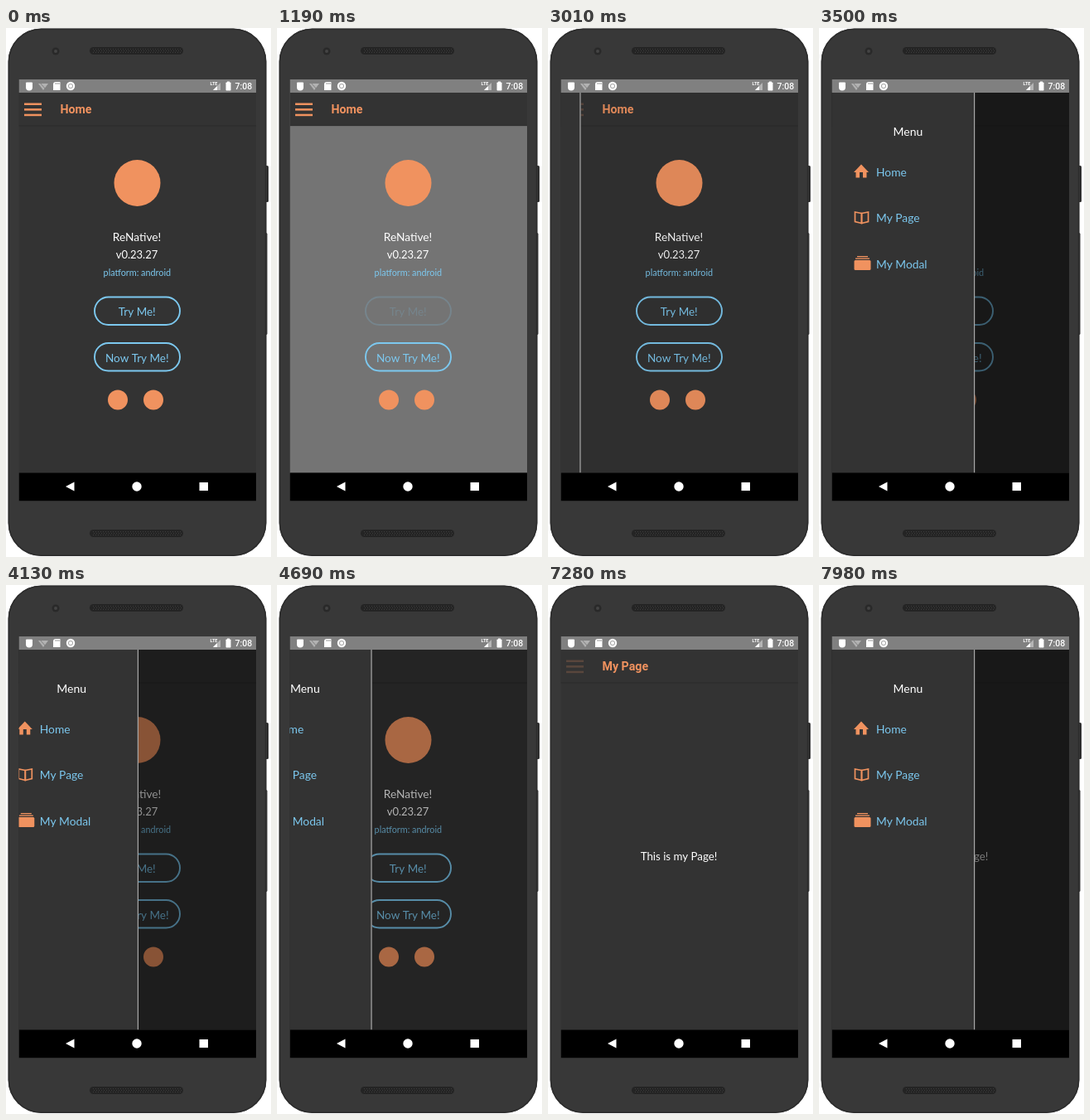
Write an HTML page with a canvas that moves like this. It is 320 px wide and 638 px high and loops after 8000 ms.

```html
<!DOCTYPE html>
<html lang="en">
<head>
<meta charset="utf-8">
<title>ReNative drawer demo</title>
<style>
  html, body { margin: 0; width: 100%; height: 100%; overflow: hidden; background: #fff; }
  canvas { display: block; width: 320px; height: 638px; }
</style>
</head>
<body>
<canvas id="stage"></canvas>
<script>
const W = 320, H = 638, LOOP = 8000;
const LEFT = 15.5, WIDTH = 286.5, TOP = 62, PAGE = 78, NAV = 536.5, BOTTOM = 570.5;
const OPEN = 188, CLOSED = 15, SLIDE = 500, SWAP = 5800;
const DARK = '#333', GREY = '#747474', ORANGE = '#f0925f', BLUE = '#7cc8ef', WHITE = '#fff';
const THIN = 'Lato, "Open Sans", sans-serif';
const UI = 'Roboto, sans-serif';

const canvas = document.getElementById('stage');
const ctx = canvas.getContext('2d');
const dpr = window.devicePixelRatio || 1;
canvas.width = W * dpr;
canvas.height = H * dpr;

// Timing

function ease(t, start, duration) {
  const u = Math.min(1, Math.max(0, (t - start) / duration));
  return u * u * (3 - 2 * u);
}

const slide = (t, start) => ease(t, start, SLIDE);

// 0 is closed, 1 is open
function drawerOpening(t) {
  return slide(t, 2893) - slide(t, 4003) + slide(t, 4416) - slide(t, SWAP) + slide(t, 7480);
}

// Opacity of a touched control: quick dip, hold, slow return
function press(t, start, hold) {
  return 1 - .8 * (ease(t, start, 60) - ease(t, start + hold, 250));
}

// Drawing helpers

function rect(x, y, w, h, color) {
  ctx.fillStyle = color;
  ctx.fillRect(x, y, w, h);
}

function round(x, y, w, h, r) {
  ctx.beginPath();
  ctx.roundRect(x, y, w, h, r);
}

function pill(x, y, w, h, r, color) {
  round(x, y, w, h, r);
  ctx.fillStyle = color;
  ctx.fill();
}

function outline(color, width) {
  ctx.strokeStyle = color;
  ctx.lineWidth = width;
  ctx.stroke();
}

function disc(x, y, r, color) {
  ctx.beginPath();
  ctx.arc(x, y, r, 0, Math.PI * 2);
  ctx.fillStyle = color;
  ctx.fill();
}

function triangle(x1, y1, x2, y2, x3, y3, color) {
  ctx.beginPath();
  ctx.moveTo(x1, y1);
  ctx.lineTo(x2, y2);
  ctx.lineTo(x3, y3);
  ctx.fillStyle = color;
  ctx.fill();
}

function text(str, x, y, size, color, align = 'left', weight = 400, family = THIN) {
  ctx.font = `${weight} ${size}px ${family}`;
  ctx.textAlign = align;
  ctx.fillStyle = color;
  ctx.fillText(str, x, y);
}

function faded(alpha, draw) {
  ctx.save();
  ctx.globalAlpha = alpha;
  draw();
  ctx.restore();
}

// Device

function speaker(y) {
  pill(101, y, 113, 9, 4.5, '#242424');
  for (let row = 0; row < 3; row++) {
    for (let x = 105; x < 211; x += 3) rect(x + row % 2, y + 2 + row * 2, 1, 1, '#3c3c3c');
  }
}

function phone() {
  rect(0, 0, W, H, WHITE);
  pill(311, 166, 6, 44, 1.5, '#2f2f2f');
  pill(311, 247, 4.5, 123, 1.5, '#2f2f2f');
  pill(2.5, .5, 312, 636.5, 40, '#383838');
  round(3.5, 1.5, 310, 634.5, 39);
  outline('#2d2d2d', 1.5);
  speaker(23);
  speaker(605);
  disc(60, 28, 4.5, '#292929');
  disc(60, 28, 2, '#444');
}

function statusBar() {
  rect(LEFT, TOP, WIDTH, PAGE - TOP, '#808080');

  pill(24, 65.5, 8, 10, [1, 1, 4, 4], WHITE);

  triangle(39, 67, 51, 67, 45, 75, '#b2b2b2');
  ctx.beginPath();
  ctx.moveTo(40, 65);
  ctx.lineTo(49, 75);
  outline('#808080', 1);

  pill(57, 65, 8.5, 10, [3, .5, .5, .5], WHITE);
  for (let x = 60; x < 65; x += 2) rect(x - .4, 66, .8, 2, '#808080');

  disc(78, 70, 5.2, WHITE);
  disc(78, 70, 3, '#a8a8a8');
  disc(78, 70, 2, WHITE);

  text('LTE', 246.5, 69, 5.5, WHITE, 'left', 700, UI);
  triangle(250, 75, 259, 66, 259, 75, '#b5b5b5');
  triangle(250, 75, 255, 70, 255, 75, WHITE);
  rect(267, 64.5, 3, 1.5, WHITE);
  pill(265.5, 65.5, 6, 10, .8, WHITE);
  text('7:08', 276.5, 74, 10.5, WHITE, 'left', 500, UI);
}

function navBar() {
  rect(LEFT, NAV, WIDTH, BOTTOM - NAV, '#000');
  triangle(72, 553, 82.5, 547.5, 82.5, 558.5, WHITE);
  disc(158, 553, 5.7, WHITE);
  rect(233.5, 548, 10.5, 10, WHITE);
}

// Pages

function header(title, barsAlpha) {
  rect(LEFT, PAGE, WIDTH, 40, DARK);
  rect(LEFT, 117.5, WIDTH, 1, 'rgba(0,0,0,.2)');
  faded(barsAlpha, () => {
    for (let i = 0; i < 3; i++) rect(22, 90.5 + i * 6.6, 21, 2.5, ORANGE);
  });
  text(title, 65.5, 103.3, 14.2, ORANGE, 'left', 700, UI);
}

function button(label, y) {
  round(107, y, 103, 33.5, 16.7);
  outline(BLUE, 1.9);
  text(label, 158.3, y + 22.5, 13.5, BLUE, 'center');
}

function homePage(t) {
  const lit = t >= 1130 && t < 1950;
  rect(LEFT, PAGE, WIDTH, NAV - PAGE, lit ? GREY : DARK);
  header('Home', press(t, 2680, 340));
  disc(158.5, 187, 28, ORANGE);
  text('ReNative!', 158, 257, 13.7, WHITE, 'center');
  text('v0.23.27', 158, 277.5, 13, WHITE, 'center');
  text('platform: android', 158.3, 298.5, 10.8, BLUE, 'center');
  faded(press(t, 880, 320) * press(t, 1700, 260), () => button('Try Me!', 324.5));
  button('Now Try Me!', 380);
  disc(135, 448.5, 12, ORANGE);
  disc(178, 448.5, 12, ORANGE);
}

function myPage(t) {
  rect(LEFT, PAGE, WIDTH, NAV - PAGE, DARK);
  header('My Page', press(t, 7220, 270));
  text('This is my Page!', 158, 332, 13.3, WHITE, 'center');
}

// Drawer

function homeIcon() {
  triangle(42, 174, 51, 164.5, 60, 174, ORANGE);
  rect(44.5, 173, 4.5, 7.5, ORANGE);
  rect(53, 173, 4.5, 7.5, ORANGE);
}

function bookIcon() {
  for (const side of [-1, 1]) {
    ctx.beginPath();
    ctx.moveTo(51.5, 223.5);
    ctx.lineTo(51.5 + 8 * side, 222);
    ctx.lineTo(51.5 + 8 * side, 233.5);
    ctx.lineTo(51.5, 235.5);
    ctx.closePath();
    outline(ORANGE, 1.7);
  }
}

function stackIcon() {
  rect(46, 275, 13, 1.3, ORANGE);
  rect(44, 277.5, 17, 1.3, ORANGE);
  pill(42.5, 280, 20, 12, 1.5, ORANGE);
}

function menuRow(label, i, icon) {
  icon();
  text(label, 69, 178.5 + i * 55.5, 13.8, BLUE);
}

function drawer(t) {
  const p = drawerOpening(t);
  if (p < .001) return;
  rect(LEFT, PAGE, WIDTH, NAV - PAGE, `rgba(0,0,0,${p * .52})`);
  ctx.save();
  ctx.translate((p - 1) * (OPEN - CLOSED), 0);
  rect(0, PAGE, OPEN, NAV - PAGE, DARK);
  rect(OPEN - 1, PAGE, 1.2, NAV - PAGE, '#a8a8a8');
  text('Menu', 89.5, 129.5, 14, WHITE);
  menuRow('Home', 0, homeIcon);
  faded(press(t, 5250, 200), () => menuRow('My Page', 1, bookIcon));
  menuRow('My Modal', 2, stackIcon);
  ctx.restore();
}

function draw(t) {
  ctx.setTransform(dpr, 0, 0, dpr, 0, 0);
  phone();
  ctx.save();
  ctx.beginPath();
  ctx.rect(LEFT, TOP, WIDTH, BOTTOM - TOP);
  ctx.clip();
  if (t < SWAP) homePage(t);
  else myPage(t);
  drawer(t);
  statusBar();
  navBar();
  ctx.restore();
}

const start = performance.now();
function tick() {
  draw((performance.now() - start) % LOOP);
  requestAnimationFrame(tick);
}
tick();
</script>
</body>
</html>
```
